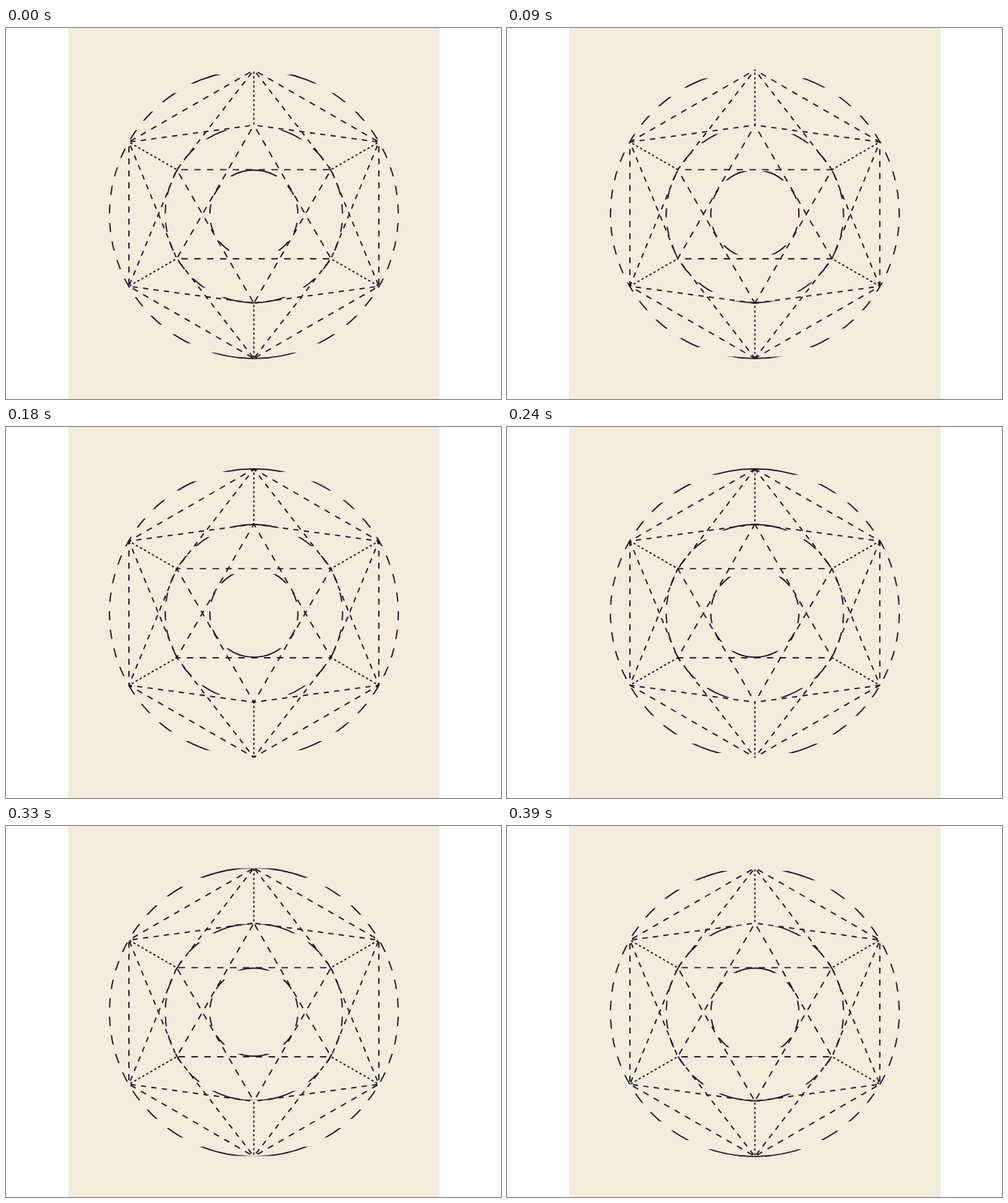
An HTML page that plays this animation: 660x495 px, repeating every 0.42 s.

```html
<!DOCTYPE html>
<html lang="en">
<head>
<meta charset="utf-8">
<title>Dashed hexagram</title>
<style>
  html, body { margin: 0; width: 100%; height: 100%; overflow: hidden; background: #fefefe; }
  svg { display: block; width: 100vw; height: 100vh; }
</style>
</head>
<body>
<svg viewBox="0 0 660 495">
  <defs><clipPath id="bands"><path id="bandPath"/></clipPath></defs>
  <rect x="83" width="495" height="495" fill="#f4ebdd"/>
  <g fill="none" stroke="#17172a" stroke-width="1.7">
    <g id="rings" clip-path="url(#bands)"></g>
    <g id="lines"></g>
  </g>
</svg>
<script>
const LOOP = 420, STEP = 30;
const CX = 330.5, CY = 248.4;
const BAND = 495 / 20;
const DASHES = 12;
const $ = id => document.getElementById(id);
const dashed = [];

function add(parent, tag, attrs) {
  const el = document.createElementNS('http://www.w3.org/2000/svg', tag);
  for (const key in attrs) el.setAttribute(key, attrs[key]);
  return parent.appendChild(el);
}

function corner(radius, i) {
  const a = (i * 60 - 90) * Math.PI / 180;
  return [CX + radius * Math.cos(a), CY + radius * Math.sin(a)];
}

// Every line holds the same number of dashes and runs downwards, or to the right if level
function line(p, q) {
  const drop = q[1] - p[1];
  const flip = Math.abs(drop) > 0.01 ? drop < 0 : q[0] < p[0];
  const [[x1, y1], [x2, y2]] = flip ? [q, p] : [p, q];
  const period = Math.hypot(x2 - x1, y2 - y1) / DASHES;
  const el = add($('lines'), 'line', { x1, y1, x2, y2, 'stroke-dasharray': period / 2 });
  dashed.push({ el, period });
}

for (const r of [192.6, 118.2, 58.7]) add($('rings'), 'circle', { cx: CX, cy: CY, r });

const outer = i => corner(192.4, i % 6);
const inner = i => corner(118.8, i % 6);
for (let i = 0; i < 6; i++) {
  line(outer(i), outer(i + 1));
  line(outer(i), inner(i + 1));
  line(outer(i), inner(i + 5));
  line(inner(i), inner(i + 2));
  line(outer(i), inner(i));
}

function draw(ms) {
  const u = Math.floor(ms % LOOP / STEP) * STEP / LOOP;
  let d = '';
  for (let i = -1; i < 20; i++) {
    d += `M83 ${(i + 0.5 + u) * BAND}h495v${BAND / 2}h-495z`;
  }
  $('bandPath').setAttribute('d', d);
  for (const { el, period } of dashed) {
    el.setAttribute('stroke-dashoffset', period * (0.64 - u));
  }
}

let start;
function tick(now) {
  if (start === undefined) start = now;
  draw(Math.max(0, now - start));
  requestAnimationFrame(tick);
}
draw(0);
requestAnimationFrame(tick);
</script>
</body>
</html>
```
